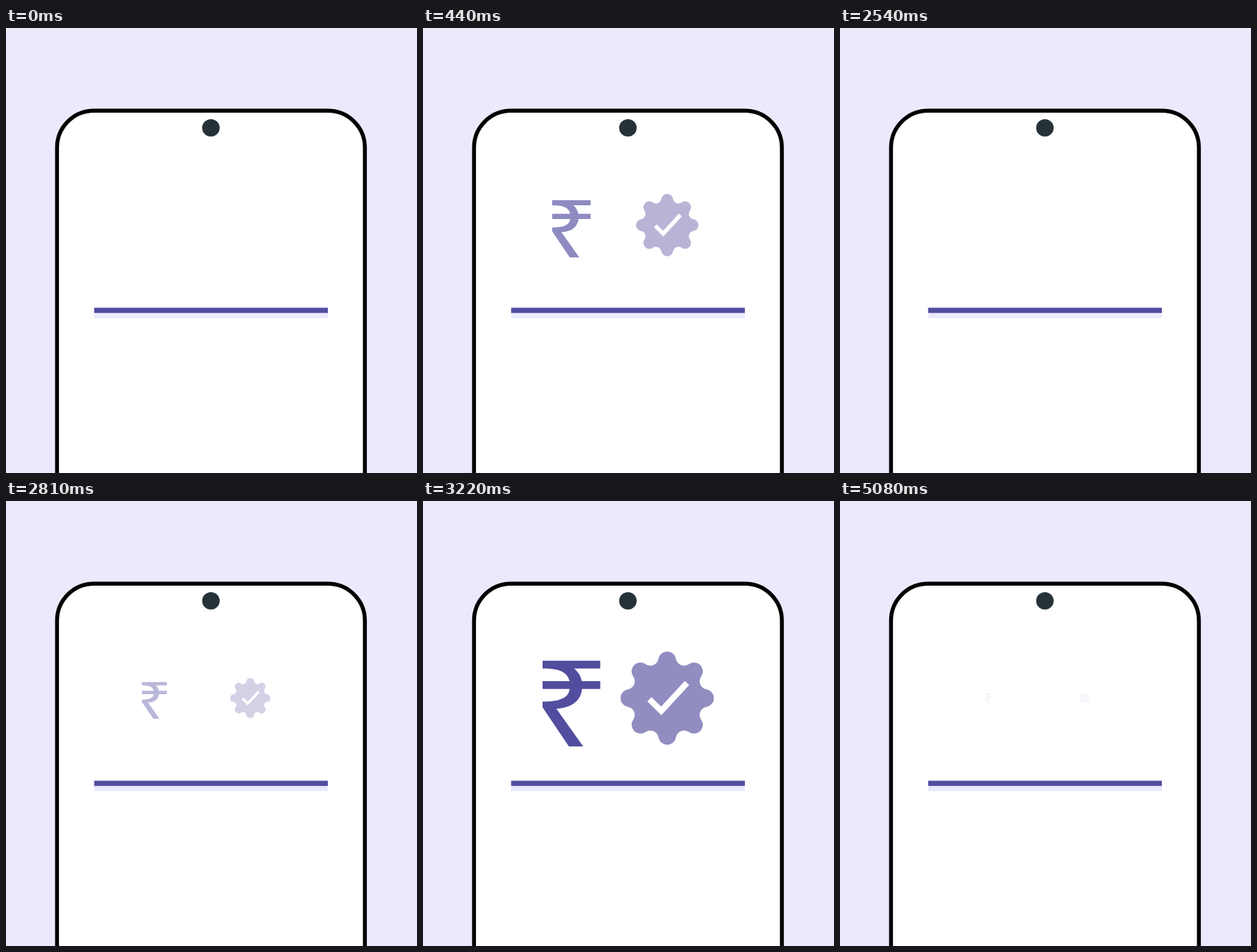
These frames come from a looping animation (567x615 px, 5.12 s). An HTML page:

```html
<!DOCTYPE html>
<html>
<head>
<meta charset="utf-8">
<style>
  html, body { margin: 0; width: 100%; height: 100%; overflow: hidden; background: #ebeafd; }
  svg { display: block; width: 567px; height: 615px; }
</style>
</head>
<body>
<svg viewBox="0 0 567 615">
  <rect x="70.4" y="114.3" width="424.7" height="600" rx="51" fill="#fff" stroke="#000" stroke-width="5.4"/>
  <circle cx="282.7" cy="138" r="12.1" fill="#263238"/>
  <rect x="121.6" y="386.6" width="322.4" height="7.3" fill="#524d9f"/>
  <rect x="121.6" y="393.9" width="322.4" height="7.1" fill="#ebeafd"/>
  <g id="rupee">
    <path fill="#524d9f" d="M165 220.8H244.5V231.5H208.5C214 236 217.8 242 219 249H244.5V259.8H219.3
      C218 276 205 286 184 287L221 339.3H201.3L165 285.3V277.3C189 277.3 201 272 202.3 259.8H165V249H202.3
      C199 236.5 189 231.5 165 231.5Z"/>
  </g>
  <g id="badge">
    <path id="seal" fill="#918dc1"/>
    <path d="M312.3 274L328.7 290L364.2 251.5" fill="none" stroke="#fff" stroke-width="8.3"/>
  </g>
</svg>
<script>
const LOOP = 5120, GROW = 678, STARTS = [5030, 2540, 0];
const $ = id => document.getElementById(id);

// Eight round lobes joined by concave arcs
function sealPath(cx, cy) {
  const point = deg => {
    const a = deg * Math.PI / 180;
    return `${cx + 55.6 * Math.cos(a)} ${cy + 55.6 * Math.sin(a)}`;
  };
  let d = 'M' + point(-12.5);
  for (let a = 0; a < 360; a += 45)
    d += `A12.2 12.2 0 0 1 ${point(a + 12.5)}A11.4 11.4 0 0 0 ${point(a + 32.5)}`;
  return d + 'Z';
}

function pop(id, x, y, p) {
  const s = 0.05 + 0.95 * p;
  $(id).setAttribute('transform', `translate(${x} ${y}) scale(${s}) translate(${-x} ${-y})`);
  $(id).setAttribute('opacity', p);
}

function draw(now) {
  const t = now % LOOP;
  const p = Math.min(1, (t - STARTS.find(s => t >= s)) / GROW);
  pop('rupee', 204.75, 272.3, p);
  pop('badge', 336.9, 272.4, p);
}

function tick() {
  draw(performance.now() - begin);
  requestAnimationFrame(tick);
}

$('seal').setAttribute('d', sealPath(336.9, 272.4));
const begin = performance.now();
tick();
</script>
</body>
</html>
```
